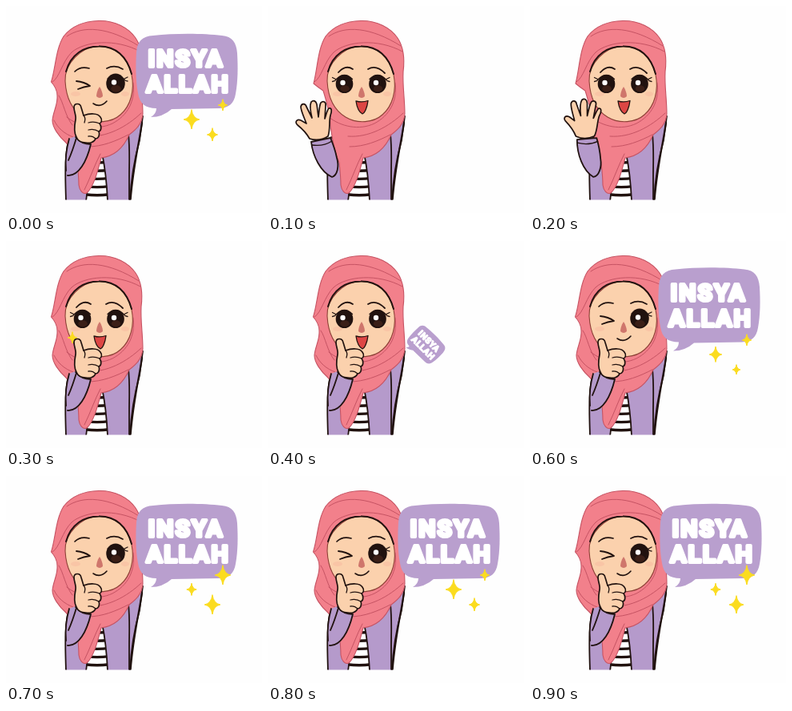
Recreate the animation shown at these times as an HTML page with a canvas. Size 320 by 259 pixels, loop 1 s.

```html
<!DOCTYPE html>
<html lang="en">
<head>
<meta charset="utf-8">
<title>Insya Allah</title>
<style>
html, body { margin: 0; width: 100%; height: 100%; overflow: hidden; background: #fefefe; }
canvas { display: block; width: 100vw; height: 100vh; }
</style>
</head>
<body>
<canvas id="stage"></canvas>
<script>
const canvas = document.getElementById('stage');
const ctx = canvas.getContext('2d');
const W = 320, H = 259, STEP = 100, STEPS = 10;
const INK = '#21120f', SKIN = '#fbd1ad', PINK = '#f2808b', FOLD = '#c65363',
      LILAC = '#b59acb', BUBBLE = '#b99fce', GOLD = '#fbdc1f';

function shape(d, fill, line, width = 1.4) {
  const p = new Path2D(d);
  if (fill) { ctx.fillStyle = fill; ctx.fill(p); }
  if (line) { ctx.strokeStyle = line; ctx.lineWidth = width; ctx.stroke(p); }
}

function oval(x, y, rx, ry, fill) {
  ctx.beginPath();
  ctx.ellipse(x, y, rx, ry, 0, 0, Math.PI * 2);
  ctx.fillStyle = fill;
  ctx.fill();
}

function group(draw) {
  ctx.save();
  draw();
  ctx.restore();
}

function turn(x, y, degrees, scale = 1) {
  ctx.translate(x, y);
  ctx.rotate(degrees * Math.PI / 180);
  ctx.scale(scale, scale);
  ctx.translate(-x, -y);
}

function star(x, y, r) {
  const k = r * 0.13;
  ctx.beginPath();
  ctx.moveTo(x, y - r);
  ctx.quadraticCurveTo(x + k, y - k, x + r * .82, y);
  ctx.quadraticCurveTo(x + k, y + k, x, y + r);
  ctx.quadraticCurveTo(x - k, y + k, x - r * .82, y);
  ctx.quadraticCurveTo(x - k, y - k, x, y - r);
  ctx.fillStyle = ctx.strokeStyle = GOLD;
  ctx.lineWidth = 1;
  ctx.fill();
  ctx.stroke();
}

function body() {
  group(() => {
    ctx.beginPath();
    ctx.rect(0, 0, W, 242.5);
    ctx.clip();
    shape('M100 178 H126 L129 243 H98Z', '#fff');
    for (let y = 195; y < 243; y += 10.2) shape(`M99 ${y} Q114 ${y + 2} 129 ${y}`, null, INK, 3.4);
    shape('M79 164 C73 186 74 215 75 244 H100 C103 226 102 198 98 176Z', LILAC, INK, 1.8);
    shape('M120 184 C124 203 126 222 127 244 H155 C156 220 161 190 167 168 L171 138 L150 158Z', LILAC, INK, 1.8);
    shape('M153 160 C155 180 154 196 154 212 V244', null, INK, 1.8);
    shape('M170 146 C167 168 159 200 155.5 244', null, INK, 2.2);
  });
}

function scarf(waving) {
  const side = waving
    ? 'C82 180 80 164 78 150 C78 134 72 116 69 106 Q63 102 57 97'
    : 'C84 184 80 176 75 171 C66 163 58 152 58 143 C59 132 65 123 64 112 C64 105 61 100 56.5 95';
  shape('M116 18.5 C136 18 153 27 162 40 C170 52 171 66 169 82 C168 100 171 116 171 135 ' +
    'C170 148 162 155 154 161 C147 177 135 188 119 190 C115 205 110 226 101 234 ' +
    `C96 236 92 231 91 224 C91 214 90 206 89 196 ${side} C62 78 62 54 72 38 C82 25 98 19 116 18.5Z`,
    PINK, FOLD, 1.1);
  const folds = [
    'M58 95 C67 90 70 70 82 58 C98 44 137 40 168 57',
    'M76 38 C96 24 128 26 166 50',
    'M159 96 C162 119 152 137 133 147 C114 156 91 151 76 139',
    'M169 134 C151 151 126 165 100 163',
    'M153 161 C137 169 121 176 102 176',
    'M118 185 C111 198 105 216 98 230'
  ];
  if (!waving) folds.push('M66 112 C72 121 74 138 83 149', 'M60 143 C65 153 73 160 84 164');
  folds.forEach(d => shape(d, null, FOLD, 1));
}

function openEye(x, y, r, side) {
  oval(x, y, r * .94, r, INK);
  oval(x + .5, y + r * .5, r * .5, r * .35, '#3b1f17');
  oval(x - 2, y - 1.5, 3.2, 3.3, '#fff');
  group(() => {
    ctx.translate(x, y);
    ctx.scale(side, 1);
    shape('M-10 -6 Q0 -16 10 -6 Q12 -3 15 -3 M11 -6 L15 -8', null, INK, 1.3);
  });
}

function face(mood) {
  shape('M116 50.5 C138 50 152 66 157 86 C161 105 156 125 143 136 C132 146 112 148 97 139 ' +
    'C82 130 75 113 74 94 C73 72 94 51 116 50.5Z', SKIN, '#8d4036', 1.1);
  shape('M75 82 C81 60 98 50.5 116 50.5 C137 50 151 63 157 85', null, INK, 1.9);
  oval(87, 110, 6, 3, '#f9c5a6');
  oval(149, 110, 5, 3, '#f9c5a6');
  shape('M117 101 C114 105 113 110 113 113 Q117 117 121 113 C121 109 119 104 117 101Z', '#cf766c');

  if (mood === 'wink') {
    shape('M86 82 Q93 75 104 78', null, INK, 1.7);
    shape('M126 78 Q136 73 146 79', null, INK, 1.7);
    shape('M88 94 Q98 95 105 100 Q97 101 90 104', null, INK, 1.8);
    openEye(137, 97, 12.5, 1);
    shape('M109 122 Q118 128 126 119', null, INK, 1.6);
    return;
  }
  shape('M88 83 Q97 73 106 79', null, INK, 1.8);
  shape('M125 79 Q135 73 146 84', null, INK, 1.8);
  openEye(95.5, 97.5, 11.5, -1);
  openEye(137, 97.5, 11.5, 1);
  if (mood === 'smile') {
    shape('M111 120 Q118 122 125 119 C124 128 114 129 111 120Z', '#de4b49', INK, 1.2);
  } else {
    shape('M110 119 Q118 121 125 118.5 C124 127 121 134 118 135 C114 133 111 126 110 119Z', '#dd4644', INK, 1.3);
  }
}

function thumbUp() {
  shape('M79 166 C74 183 73 203 78 213 C92 212 102 193 107 173 L87 163Z', LILAC);
  shape('M79 166 C75 180 74 195 75 206 M88 165 C85 175 82 184 78 193', null, INK, 1.8);
  shape('M77 212 C91 213 101 194 106 173 Q94 173 87 164', null, INK, 1.8);
  shape('M85 127 C85 121 93 121 94 127 L97 137 C105 134 115 134 118 139 C121 143 119 146 117 147 ' +
    'C120 151 119 156 116 157 C118 162 115 166 112 166 C110 171 104 172 100 171 C94 171 90 169 88 164 ' +
    'C84 157 86 147 87 142 C88 137 85 132 85 127Z', SKIN, INK, 1.7);
  shape('M97 137 Q100 140 98 146 M103 146 Q110 144 117 147 M103 155 Q110 153 116 157 M103 163 Q108 162 112 166', null, INK, 1.3);
}

function wave(tilt) {
  group(() => {
    turn(80, 208, tilt);
    shape('M54 170 C56 188 66 208 80 214 C87 212 89 200 86 190 C84 180 81 172 78 165Z', LILAC, INK, 1.8);
    shape('M55 174 Q69 176 80 169', null, INK, 1.3);
    ctx.translate(-2, -2);
    shape('M54 168 C50 161 44 155 39 151 C35 147 38 143 43 145 L50 149 C47 141 43 133 43 128 ' +
      'C44 123 49 124 50 128 L57 142 C55 134 54 126 56 122 C59 119 62 121 63 125 L65 141 ' +
      'C66 134 66 127 68 123 C71 120 75 122 74 127 L73 143 C75 137 76 132 78 130 ' +
      'C82 129 82 134 80 139 C78 147 80 157 77 165 Q66 172 54 168Z', SKIN, INK, 1.7);
  });
}

function bubble(b) {
  group(() => {
    ctx.translate(b.x, b.y);
    turn(183, 138, b.turn, b.scale);
    shape('M184 37 C210 34 246 34 270 37 C283 38 288 46 289 59 C290 76 290 94 287 110 ' +
      'C285 122 279 127 267 128 L207 129 Q196 139 181 139 Q188 135 188 128 ' +
      'C174 128 167 122 165 109 C162 94 162 73 163 58 C164 44 170 38 184 37Z', BUBBLE);
    ctx.font = '700 30px Roboto, Lato, sans-serif';
    ctx.letterSpacing = '2px';
    ctx.textAlign = 'center';
    ctx.fillStyle = ctx.strokeStyle = '#fff';
    ctx.lineWidth = 4;
    [['INSYA', 225, 76], ['ALLAH', 227.5, 108]].forEach(line => {
      ctx.strokeText(...line);
      ctx.fillText(...line);
    });
  });
}

const SPOTS = [[232, 142], [258, 161], [271, 124]];
const FULL = { x: 0, y: 0, turn: 0, scale: 1 };
const pose = (mood, more) => ({ mood, ...more });
const glow = (...stars) => pose('wink', { bubble: FULL, stars });

const POSES = [
  glow(12, 8, 7),
  pose('open', { tilt: 0 }),
  pose('open', { tilt: 7 }),
  pose('open', { spark: 7 }),
  pose('open', { bubble: { x: -10, y: -5, turn: 45, scale: .35 } }),
  pose('smile', { bubble: { x: -10, y: -5, turn: 28, scale: .74 } }),
  pose('wink', { bubble: { x: -2, y: -1.5, turn: 0, scale: 1 }, stars: [9.5, 6, 7] }),
  glow(7.5, 12, 12),
  glow(12, 8, 7),
  glow(7.5, 11, 12)
];

function draw(p) {
  const waving = p.tilt !== undefined;
  body();
  scarf(waving);
  face(p.mood);
  if (p.spark) star(83, 121, p.spark);
  if (waving) wave(p.tilt); else thumbUp();
  if (p.bubble) bubble(p.bubble);
  if (p.stars) p.stars.forEach((r, i) => star(...SPOTS[i], r));
}

function frame() {
  const ratio = window.devicePixelRatio || 1;
  const w = Math.round(innerWidth * ratio), h = Math.round(innerHeight * ratio);
  if (canvas.width !== w || canvas.height !== h) {
    canvas.width = w;
    canvas.height = h;
  }
  ctx.setTransform(w / W, 0, 0, h / H, 0, 0);
  ctx.lineCap = ctx.lineJoin = 'round';
  ctx.fillStyle = '#fefefe';
  ctx.fillRect(0, 0, W, H);
  draw(POSES[Math.floor(performance.now() / STEP) % STEPS]);
  requestAnimationFrame(frame);
}
frame();
</script>
</body>
</html>
```
